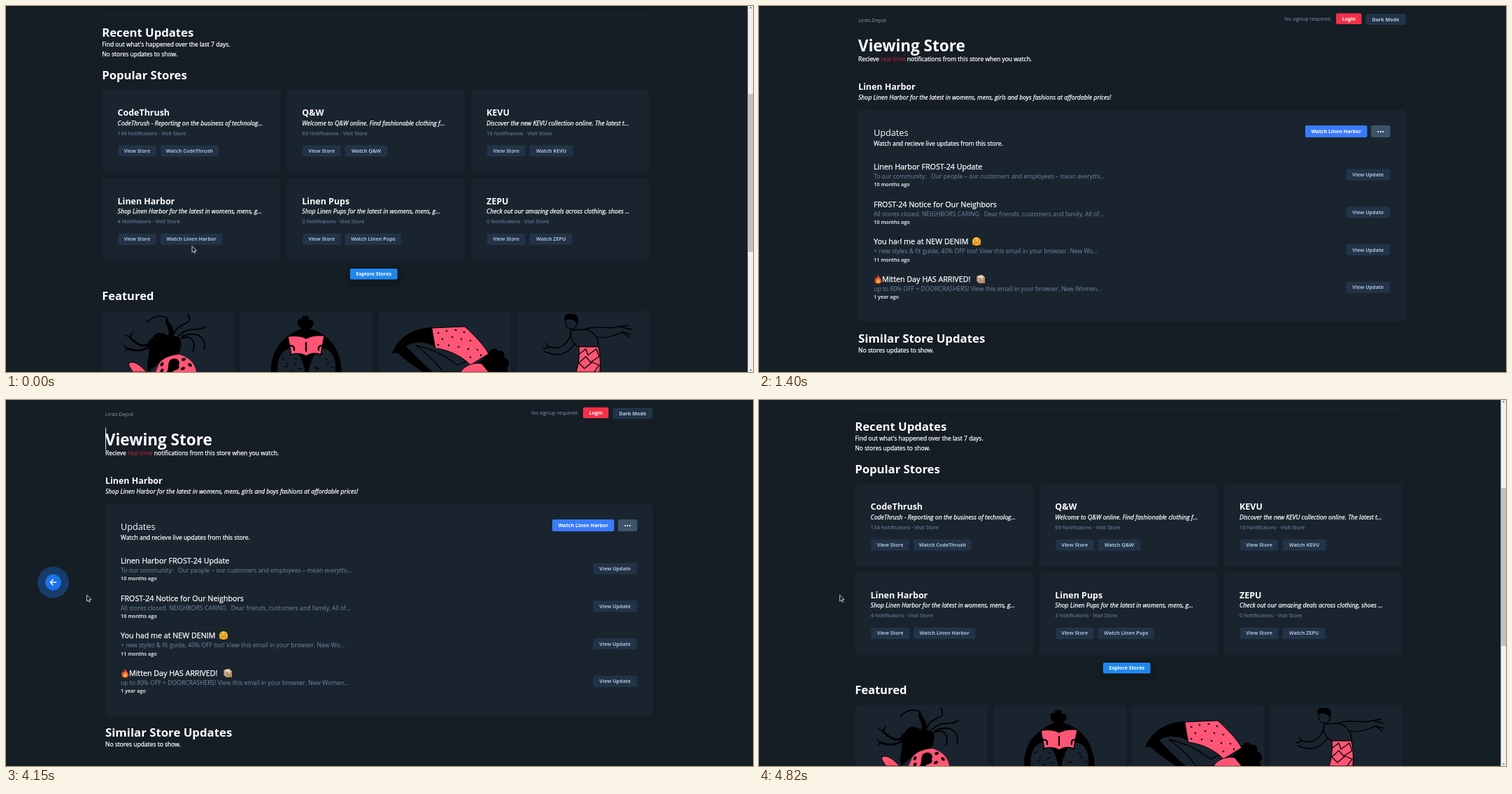
Recreate the animation shown at these times as an HTML page. Size 1068 by 524 pixels, loop 5240 ms.

```html
<!DOCTYPE html>
<html lang="en">
<head>
<meta charset="utf-8">
<title>Store watch</title>
<style>
html,body{margin:0;width:100%;height:100%;overflow:hidden;background:#151d25}
svg{display:block;width:1068px;height:524px;font-family:"Open Sans","Noto Sans",sans-serif}
text{fill:#fff;white-space:pre}
.b{font-weight:700}
.s{font-weight:600}
.i{font-style:italic}
.m{stroke:#fff;stroke-width:.25px}
.btn{font-weight:700;font-size:7.15px;text-anchor:middle}
.mid{text-anchor:middle}
</style>
</head>
<body>
<svg id="stage" viewBox="0 0 1068 524"></svg>
<script>
const LOOP = 5240;
const BG = '#151d25', CARD = '#1a242f', BTN = '#233347', MUTED = '#7492b2', PINK = '#ff5576';

const text = (x, y, size, cls, str, fill) =>
  `<text x="${x}" y="${y}" font-size="${size}" class="${cls}"${fill ? ` style="fill:${fill}"` : ''}>${str}</text>`;
const box = (x, y, w, h, fill, r = 0) =>
  `<rect x="${x}" y="${y}" width="${w}" height="${h}" rx="${r}" fill="${fill}"/>`;
const path = (d, fill = 'none', stroke = 'none', w = 1) =>
  `<path d="${d}" fill="${fill}" stroke="${stroke}" stroke-width="${w}" stroke-linecap="round" stroke-linejoin="round"/>`;
const line = (d, w) => path(d, 'none', '#000', w);
const button = (x, y, w, h, str, fill = BTN, ink = '#a9bed3') =>
  box(x, y, w, h, fill, 2) + `<text class="btn" x="${x + w / 2}" y="${y + h / 2 + 2.6}" style="fill:${ink}">${str}</text>`;
const group = (id, body, attrs = '') => `<g id="${id}" ${attrs}>${body}</g>`;
const spots = (list, r) => list.map(([x, y]) =>
  `<ellipse cx="${x}" cy="${y}" rx="${r}" ry="${r * .7}" transform="rotate(${x * 7} ${x} ${y})"/>`).join('');

const nav = text(142, 22.5, 7.3, '', 'Lirdo.Depot', '#8d9aa8') +
  text(751, 21, 7.37, '', 'No signup required.', '#7e96b1') +
  button(825, 10.5, 36.5, 15.6, 'Login', '#f42f48', '#fff') +
  button(867.5, 11, 57, 16, 'Dark Mode', BTN, '#b9cadb');

/* Home page */
const stores = [
  ['CodeThrush', 'CodeThrush - Reporting on the business of technolog...', 134, 82.5],
  ['Q&amp;W', 'Welcome to Q&amp;W online. Find fashionable clothing f...', 69, 60.5],
  ['KEVU', 'Discover the new KEVU collection online. The latest t...', 16, 62],
  ['Linen Harbor', 'Shop Linen Harbor for the latest in womens, mens, g...', 4, 88],
  ['Linen Pups', 'Shop Linen Pups for the latest in womens, mens, g...', 3, 80],
  ['ZEPU', 'Check out our amazing deals across clothing, shoes ...', 0, 61]
];
const grid = draw => stores.map((s, i) =>
  `<g transform="translate(${137.4 + i % 3 * 263.75} ${120.5 + (i / 3 | 0) * 126.4})">${box(0, 0, 255, 118, CARD, 5)}${draw(s)}</g>`).join('');

const storeCard = ([name, about, count, w]) =>
  text(22.2, 36.9, 12.45, 'b', name) +
  text(22.2, 50.6, 8.7, 'i m', about) +
  text(22.2, 64.4, 7.55, '', `${count} Notificaions · Visit Store`, MUTED) +
  button(23, 79, 54.4, 16, 'View Store') + button(83.7, 79, w, 16, 'Watch ' + name);

const bars = (list, y, h, fill) => list.map(([x, w]) => box(x, y, w, h, fill)).join('');
const GHOST = '#dddedd';
const emptyCard = () =>
  box(21.7, 32, 43.3, 6.5, GHOST) +
  `<g transform="translate(16.5 0) skewX(-18)">${bars([[23, 11], [45, 62], [118, 51]], 48.4, 3.6, GHOST)}</g>` +
  bars([[22, 5.5], [37, 59]], 61, 3.5, '#7b9bbb') + bars([[102, 26], [137, 25]], 61, 3.5, GHOST) +
  box(23, 79, 70.6, 16, BTN, 2) + box(100, 79, 76, 16, BTN, 2) +
  bars([[31, 20.5], [60, 26], [108, 26], [142.5, 26]], 87.7, 3.5, GHOST);

const dancer =
  path('M211 473C216 464 226 468 234 474C246 468 254 480 249 490C250 500 236 506 226 508C216 512 210 518 204 524C198 512 208 498 203 488C200 482 206 478 211 473Z', '#000') +
  line('M212 478C200 492 188 486 177 474M206 486C196 496 184 494 173 490', 3) +
  line('M177 474L170 471M177 474L181 468M173 490L169 486M173 490L171 494', 1.6) +
  path('M231 473C238 462 222 455 231 444C229 454 244 458 239 474Z', '#000') +
  line('M230 447C220 440 208 446 202 453M240 470C246 450 270 460 260 441M246 473C262 456 274 468 285 459M248 477C266 468 272 482 267 494M252 473C274 464 288 476 283 492', 1.8) +
  path('M218 514C222 504 236 500 247 499C260 502 270 510 272 524H214Z', PINK) +
  path('M236 506C244 502 250 508 247 514C250 522 240 520 238 524H230C234 516 230 510 236 506Z', '#000') +
  path('M176 511C184 507 192 515 201 524H181C179 518 174 516 176 511Z', PINK, '#000', 1) +
  spots([[223, 513], [254, 506], [263, 514], [253, 519], [223, 522]], 3);
const tick = (x, y) => `M${x} ${y}l3 -2M${x + 7} ${y + 5}l3 1`;
const ticks = [[394, 506], [406, 500], [399, 517], [412, 514], [434, 512], [449, 500], [444, 520], [459, 512]];
const reader =
  path('M379 524C378 502 388 484 400 475C410 467 420 462 428 461C440 462 456 470 464 480C475 492 479 508 480 524Z', '#000') +
  path('M418 458C414 449 420 446 424 449C418 442 438 442 432 449C440 448 442 454 438 459C434 464 422 464 418 458Z', '#000') +
  path('M388 524C386 506 394 490 408 490C420 494 426 510 428 524ZM432 524C434 510 440 494 452 490C466 490 474 506 471 524Z', CARD, '#000', 1) +
  line(ticks.map(p => tick(...p)).join(''), 1.3) +
  path('M403 473C412 472 422 472 429 476C437 472 447 471 455 472L450 499C443 496 436 497 429 501C422 497 415 497 408 499Z', PINK, '#000', 1.3) +
  line('M429 482V494M404 488C409 484 413 488 412 493M454 488C449 484 446 488 447 493', 2.2);
const arch =
  path('M552 497C560 475 582 460 612 460L614 488C600 480 584 480 572 487C582 498 594 510 610 524H596C580 514 568 504 560 497Z', '#000') +
  path('M586 486C606 490 628 500 645 514C656 510 676 500 690 497L676 524H624C616 510 602 498 586 486Z', CARD, '#000', 1.3) +
  path('M609 461L656 459C668 470 684 486 690 498L664 514C652 501 632 492 614 490Z', PINK, '#000', 1) +
  path('M690 497C694 488 702 490 703 494C712 491 714 500 712 503C721 505 720 516 716 518L718 524H660C664 516 680 510 690 497Z', '#000') +
  path('M650 524C656 514 668 510 680 512L690 524Z', PINK, '#000', 1) +
  spots([[618, 468], [630, 465], [643, 464], [655, 467], [624, 477], [638, 474], [651, 477], [664, 479], [618, 485], [633, 486], [647, 488], [661, 491], [674, 492], [664, 503], [679, 500]], 1.5);
const walker =
  path('M808 464C804 474 812 486 819 488L847 488C848 478 842 466 828 463Z', CARD, '#000', 1.4) +
  path('M800 450C799 442 814 440 817 448C818 458 812 466 804 461C801 459 800 454 800 450Z', CARD, '#000', 1.3) +
  path('M799 450C796 442 804 439 809 441C818 440 820 449 816 455C812 448 806 448 799 450Z', '#000') +
  line('M828 463C846 456 860 464 876 459L890 457M844 474C858 477 870 471 882 467L893 470M876 459L894 463M881 467L892 475M808 468C804 484 792 493 776 488L768 491M814 483C802 499 790 502 776 497L770 495M776 488L772 483', 1.5) +
  path('M819 488L847 488C850 500 850 512 849 524H815C819 512 820 500 819 488Z', PINK, '#000', 1.2) +
  line('M820 498L829 491L832 500L844 491L848 502L836 510L829 502L819 511L827 519L838 510L848 514L841 524', 1.3);

const featured = [137.4, 335.2, 533, 730.8].map(x => box(x, 436.7, 189.3, 140, CARD, 5)).join('') +
  dancer + reader + arch + walker;

const home = group('page',
  group('bar', nav, 'transform="translate(-4.5 -278)"') +
  text(528.7, -109.5, 22.2, 'b mid', 'Watch for Updates') +
  text(529, -94.7, 8.5, 'm mid', 'Look for a product and get live updates wherever you are.') +
  box(137.4, 13.2, 783, .8, '#1f2a36') +
  text(137.2, 44, 16.7, 'b', 'Recent Updates') +
  text(137.2, 58.2, 8.5, 'm', "Find out what's happened over the last 7 days.") +
  text(137.2, 71.6, 8.5, 'm', 'No stores updates to show.') +
  text(137.2, 104.8, 16.7, 'b', 'Popular Stores') +
  group('empty', grid(emptyCard)) +
  group('full', grid(storeCard) +
    `<rect x="492" y="379" width="67.6" height="17" rx="4" fill="#0c1219" filter="url(#soft)"/>` +
    button(492, 376, 67.6, 15.6, 'Explore Stores', '#2087ef', '#fff') +
    text(137.2, 421.3, 16.5, 'b', 'Featured') + featured)) +
  box(1060.5, 0, 7.5, 524, '#f1f1f1') + '<rect id="thumb" x="1061.2" width="6.8" fill="#c1c1c1"/>' +
  path('M1063 3.2L1064.6 1L1066.2 3.2ZM1063 520.4L1064.6 522.6L1066.2 520.4Z', '#505050');

/* Store page */
const updates = [
  ['Linen Harbor FROST-24 Update', 'To our community:\u00a0\u00a0 Our people – our customers and employees – mean everythi...', '10 months ago'],
  ['FROST-24 Notice for Our Neighbors', 'All stores closed. NEIGHBORS CARING\u00a0\u00a0 Dear friends, customers and family, All of...', '10 months ago'],
  ['You had me at NEW DENIM', '+ new styles &amp; fit guide, 40% OFF too! View this email in your browser. New Wo...', '11 months ago'],
  ['Mitten Day HAS ARRIVED!', 'up to 80% OFF + DOORCRASHERS! View this email in your browser. New Women...', '1 year ago']
];
const STEP = 53.7;
const rows = updates.map(([title, body, age], i) => {
  const y = i * STEP;
  return text(i == 3 ? 176 : 164, 234 + y, 10.7, 'm', title) +
    text(164, 246.8 + y, 8.6, '', body, '#7089a2') +
    text(164, 258.3 + y, 7.25, 's', age) +
    button(839.6, 233.6 + y, 62.4, 16, 'View Update');
}).join('');
const rules = [0, 1, 2, 3, 4].map(i => box(164, 214.2 + i * STEP, 738, .8, '#16202a')).join('');

const hug = '<circle cx="311" cy="337" r="6" fill="#fdc23a"/>' +
  path('M307.5 335.2Q308.5 333.6 309.5 335.2M312.5 335.2Q313.5 333.6 314.5 335.2M308 337.5Q311 341 314 337.5', 'none', '#5b3512', .9) +
  path('M306 340.5L309 341.5M316 340.5L313 341.5', 'none', '#f0921f', 2.4);
const flame = path('M169 385C172 388 175 390 175 394C175 399 165.5 399 165.5 393.5C165.5 391 167 390 167 388C168 389 168.5 390 169 390C170 388 169 387 169 385Z', '#ee5a2b') +
  path('M170 390C172 392 173 393 172.5 395C171.5 398 167.5 397 168 394C169 394 170 392 170 390Z', '#fdb944');
const parcel = path('M311.5 387L319 385L323 389V396.5L315 397L311.5 394Z', '#c9a685') +
  path('M311.5 387L319 385L323 389L315 389.5Z', '#e6cdb0') + path('M315 389.5L323 389V396.5L315 397Z', '#b58f6d') +
  path('M315 386L319 389.2V392', 'none', '#f2e7d8', 1.2);

const store = group('store', nav +
  text(141.8, 64.8, 22.5, 'b', 'Viewing Store') +
  text(142, 79.3, 8.5, 'm', 'Recieve <tspan style="fill:#cf2440;stroke:none">real-time</tspan> notifications from this store when you watch.') +
  box(142, 93.9, 783, .8, '#1f2a36') +
  text(142, 120, 12.45, 'b', 'Linen Harbor') +
  text(142, 134.2, 8.69, 'i m', 'Shop Linen Harbor for the latest in womens, mens, girls and boys fashions at affordable prices!') +
  path('M155 149.5L160 146.5L165 149.5Z', CARD) + box(142, 149, 783, 303, CARD, 5) +
  text(164, 185.6, 12.7, '', 'Updates') +
  text(164, 199.6, 8.5, 'm', 'Watch and recieve live updates from this store.') +
  button(781, 171, 88.5, 17, 'Watch Linen Harbor', '#3a7bfd', '#fff') +
  box(875, 171, 27.5, 17, '#3d556b', 2) +
  [885.3, 888.7, 892.1].map(x => `<circle cx="${x}" cy="180" r="1.1" fill="#fff"/>`).join('') +
  rules + rows + hug + flame + parcel +
  text(142, 482, 16.8, 'b', 'Similar Store Updates') +
  text(142, 496, 8.5, 'm', 'No stores updates to show.') +
  group('caret', box(142, 39.5, .9, 31.5, '#fff')));

const loading = group('loading', nav +
  group('navCaret', box(915.6, 13.5, .9, 11, '#fff')) +
  group('spin', path('M529.5 269A8 8 0 0 1 527.3 256.9', 'none', '#c6cbd0', 1.1)));

const status = (id, str) => group(id, path('M0 515H351Q353.5 515 353.5 517.5V524H0Z', '#dee1e6') +
  text(-.5, 522.7, 6.35, '', str, '#3c4248'));

const back = group('back',
  '<circle id="halo" r="22.5" fill="#1a73e8" opacity=".36"/><circle r="11.4" fill="#1a73e8"/>' +
  path('M4.2 0H-4M-.3 -4L-4.2 0L-.3 4', 'none', '#fff', 1.3));

const arrow = group('arrow', path('M0 0V8.6L2 6.9L3.4 9.8L4.8 9.2L3.5 6.3H6.1Z', '#10151b', '#fff', .75));
const beam = group('beam', line('M-2 -4.5H-.5L0 -4L.5 -4.5H2M0 -4V4M-2 4.5H-.5L0 4L.5 4.5H2', .9));

const stage = document.getElementById('stage');
stage.innerHTML = '<defs><filter id="soft" x="-30%" y="-80%" width="160%" height="260%"><feGaussianBlur stdDeviation="4"/></filter></defs>' +
  box(0, 0, 1068, 524, BG) + group('home', home) + loading + store +
  status('link', 'devserver:4100/store/linen-harbor-zz') + status('wait', 'Connecting...') +
  back + arrow + beam;

const el = {};
stage.querySelectorAll('[id]').forEach(n => el[n.id] = n);

/* Motion: [time, ...values], eased between steps */
const POINTER = [[20, 266, 344], [500, 198.5, 336], [1300, 198.5, 336], [1301, 200.5, 336], [1930, 200.5, 336],
  [1960, 201.7, 333], [2090, 202.5, 330.5], [3340, 202.5, 330.5], [3400, 115.5, 279.5]];
const LINK = [[630, 0], [720, 1], [1000, 1], [1160, 0]];
const WAIT = [[4415, 0], [4440, 1], [4560, 1], [4700, 0]];
const BACK_X = [[4050, -14], [4140, 67.5]];
const BACK_FADE = [[4320, 1], [4410, 0]];
const HALO = [[4070, 11], [4145, 22.5]];

const OPEN = 760, READY = 1300, RETURN = 4410, FILLED = 4580, TOP = 278;

function at(keys, t) {
  if (t <= keys[0][0]) return keys[0].slice(1);
  for (let k = 1; k < keys.length; k++) {
    const a = keys[k - 1], b = keys[k];
    if (t < b[0]) {
      const p = (t - a[0]) / (b[0] - a[0]), e = p * p * (3 - 2 * p);
      return a.slice(1).map((v, j) => v + (b[j + 1] - v) * e);
    }
  }
  return keys[keys.length - 1].slice(1);
}
const show = (n, on) => n.style.display = on ? '' : 'none';
const set = (n, name, v) => n.setAttribute(name, v);

function draw(t) {
  const opened = t >= OPEN && t < READY, inStore = t >= READY && t < RETURN, loadingCards = t >= RETURN && t < FILLED;
  show(el.home, !opened && !inStore);
  show(el.loading, opened);
  show(el.store, inStore);
  show(el.empty, loadingCards);
  show(el.full, !loadingCards);

  const p = Math.min(1, Math.max(0, (t - RETURN) / 400));
  const scroll = t < RETURN ? TOP : TOP * (1 - Math.pow(1 - p, 1.88));
  set(el.page, 'transform', `translate(0 ${TOP - scroll})`);
  set(el.thumb, 'y', 6 + scroll * (loadingCards ? .394 : .4317));
  set(el.thumb, 'height', loadingCards ? 205 : 226);

  set(el.spin, 'transform', `rotate(${(t - 1080) * .45} 533.6 262)`);
  show(el.navCaret, t < 1230);
  show(el.caret, t >= 1760 && Math.floor((t - 1760) / 527) % 2 === 0);

  set(el.link, 'opacity', at(LINK, t)[0]);
  set(el.wait, 'opacity', at(WAIT, t)[0]);

  show(el.back, t >= 4050 && t < RETURN);
  set(el.back, 'transform', `translate(${at(BACK_X, t)[0]} 261)`);
  set(el.back, 'opacity', at(BACK_FADE, t)[0]);
  set(el.halo, 'r', at(HALO, t)[0]);

  const overText = t >= READY && t < 3370;
  const [x, y] = at(POINTER, t);
  show(el.arrow, !overText);
  show(el.beam, overText);
  set(overText ? el.beam : el.arrow, 'transform', `translate(${x} ${y})`);
}

const start = performance.now();
function frame() {
  draw((performance.now() - start) % LOOP);
  requestAnimationFrame(frame);
}
frame();
</script>
</body>
</html>
```
